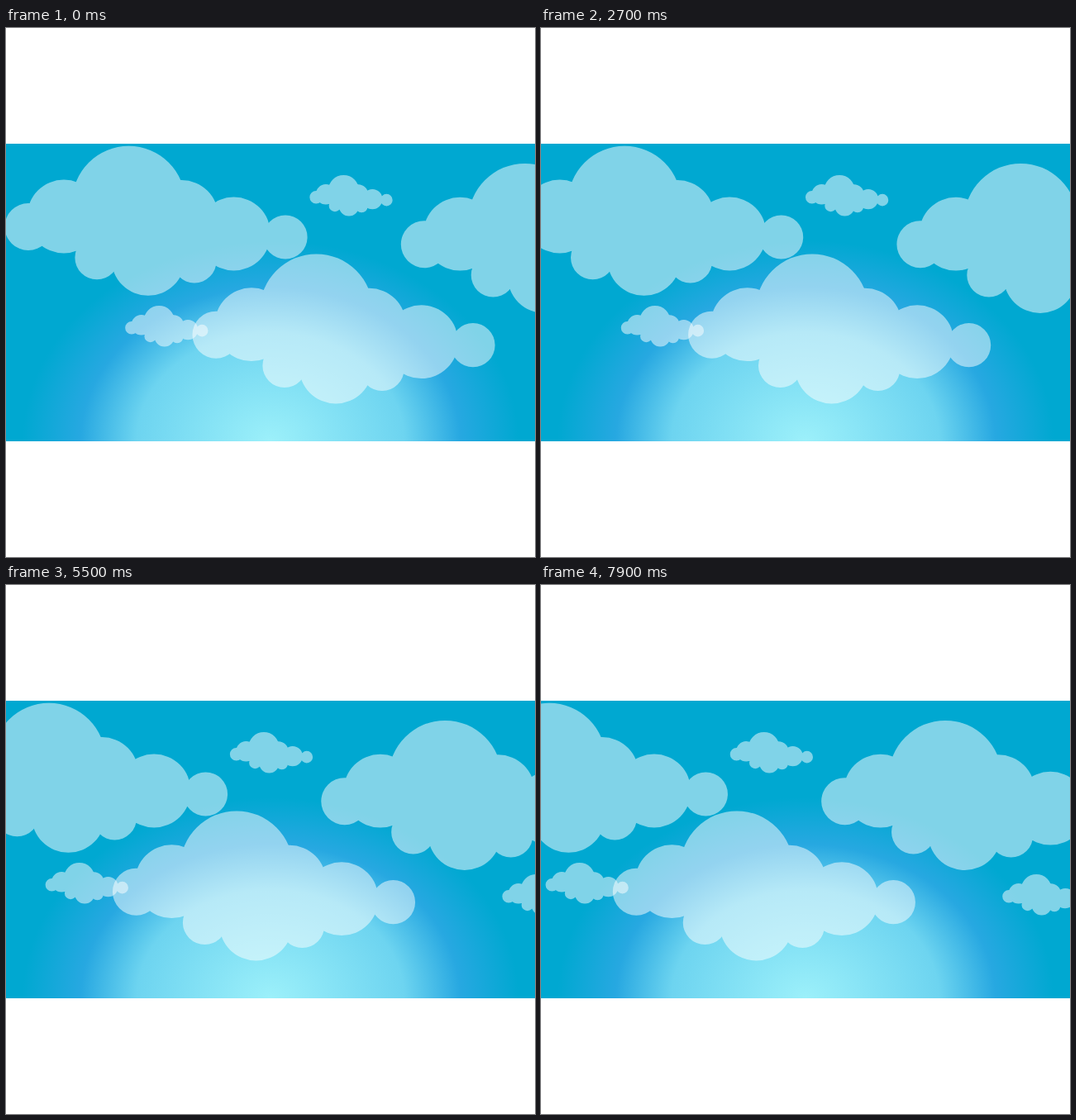
Animation of 640x640 px, one loop 8000 ms. Source, as an HTML page:

```html
<!DOCTYPE html>
<html lang="en">
<head>
<meta charset="utf-8">
<title>Drifting clouds</title>
<style>
  html, body { margin: 0; width: 100%; height: 100%; overflow: hidden; background: #fff; }
  svg { display: block; width: 100%; height: 100%; }
</style>
</head>
<body>
<svg viewBox="0 0 640 640">
  <defs>
    <radialGradient id="glow" gradientUnits="userSpaceOnUse" r="1"
      gradientTransform="translate(320 500) scale(300 243)" cx="0" cy="0">
      <stop offset="0" stop-color="#9cf0fa"/>
      <stop offset="0.54" stop-color="#6dd4f0"/>
      <stop offset="0.765" stop-color="#27a8e1"/>
      <stop offset="1" stop-color="#00a8d1"/>
    </radialGradient>
  </defs>
  <rect y="140" width="640" height="360" fill="url(#glow)"/>
  <g id="clouds" fill="#fff" fill-opacity="0.5"></g>
</svg>
<script>
  const LOOP = 8000, STEP = 100, SPEED = 17.55; // ms, ms, px per second

  const circle = (x, y, r) =>
    `M${x - r} ${y}a${r} ${r} 0 1 1 ${2 * r} 0a${r} ${r} 0 1 1 ${-2 * r} 0z`;
  const puffs = (r, ...centres) => centres.map(([x, y]) => circle(x, y, r)).join("");

  // One path, so that overlapping puffs blend as a single shape
  const shape =
    puffs(68.3, [149.5, 68]) +
    puffs(44.4, [71, 85], [213.5, 85.5], [276.6, 106], [173, 136.4]) +
    puffs(26.6, [339, 110], [111, 134.7], [229, 138.8]) +
    puffs(28.5, [28, 97.5]);

  const cloud = (x, y, scale = 1) =>
    `<path d="${shape}" transform="translate(${x} ${y}) scale(${scale})"/>`;
  const cloudlet = (x, y) => cloud(x, y, 0.274);

  const layer = document.getElementById("clouds");
  layer.innerHTML =
    cloud(-1, 143) + cloud(478.3, 164.2) + cloud(226, 273.7) +
    cloudlet(367.5, 178) + cloudlet(144.3, 336) + cloudlet(697, 350);

  const start = performance.now();

  function draw(now) {
    const t = Math.max(0, now - start) % LOOP;
    const shift = Math.floor(t / STEP) * STEP / 1000 * SPEED;
    layer.setAttribute("transform", `translate(${-shift} 0)`);
    requestAnimationFrame(draw);
  }
  draw(start);
</script>
</body>
</html>
```
